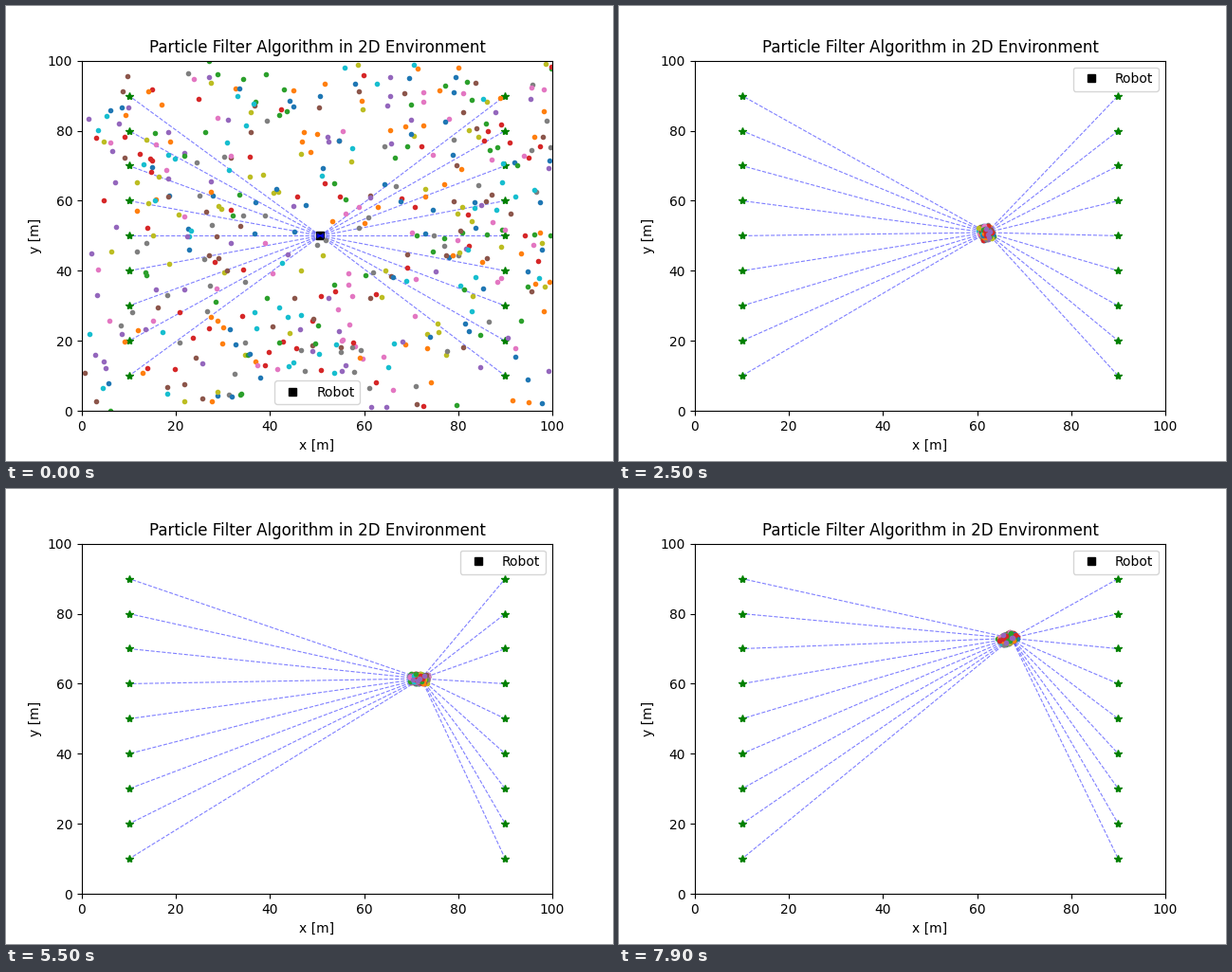
Animation of 640x480 px, one loop 8 s. Source, as a matplotlib script:

```python
import numpy as np
import matplotlib.pyplot as plt
from matplotlib.animation import FuncAnimation

FRAMES = 80
COUNT = 500
GROUP = 4   # particles sharing one line artist
SPAN = 16   # frames between two waypoints

WAYPOINTS = np.array([(50.7, 50), (58.05, 49.8), (65.1, 52.4),
                      (71.3, 57.7), (71.7, 66.6), (67, 73.4)])
TANGENTS = np.gradient(WAYPOINTS, axis=0)
LANDMARKS = [(x, y) for x in (10, 90) for y in range(10, 100, 10)]


def robot_at(i):
    """Robot position on a smooth curve through the waypoints."""
    k, step = divmod(i, SPAN)
    t = step / SPAN
    p0, p1 = WAYPOINTS[k:k + 2]
    m0, m1 = TANGENTS[k:k + 2]
    ease = t * t * (3 - 2 * t)
    return p0 + ease * (p1 - p0) + t * (1 - t) * ((1 - t) * m0 - t * m1)


def particles(i):
    """Uniform before the first resampling, then a cloud across the heading."""
    rng = np.random.default_rng(100 + i)
    if i == 0:
        cloud = rng.uniform(0, 100, (COUNT, 2))
        under_legend = (abs(cloud[:, 0] - 50) < 10) & (cloud[:, 1] < 10)
        cloud[under_legend, 1] += 10
        return cloud
    ahead = robot_at(i) - robot_at(i - 1)
    c, s = ahead / np.hypot(*ahead)
    spread = np.clip(rng.normal(size=(COUNT, 2)), -2.1, 2.1) * (0.62, 0.88)
    lag = (-0.01 * i, 0)
    return robot_at(i) + lag + spread @ np.array([(c, s), (-s, c)])


fig, ax = plt.subplots(figsize=(6.4, 4.8), dpi=100)
ax.set(xlim=(0, 100), ylim=(0, 100), xlabel="x [m]", ylabel="y [m]",
       title="Particle Filter Algorithm in 2D Environment")

robot, = ax.plot([], [], "ks", label="Robot")
beams = []
for x, y in LANDMARKS:
    beams += ax.plot([], [], "b--", lw=0.8, alpha=0.5)
    ax.plot(x, y, "g*")
dots = [ax.plot([], [], ".", color=f"C{n % 10}")[0]
        for n in range(COUNT // GROUP)]
legend = ax.legend(loc="upper right")


def draw(i):
    rx, ry = robot_at(i)
    robot.set_data([rx], [ry])
    for beam, (x, y) in zip(beams, LANDMARKS):
        beam.set_data([rx, x], [ry, y])
    for dot, part in zip(dots, np.split(particles(i), len(dots))):
        dot.set_data(*part.T)
    legend.set_loc("upper right" if i else "lower center")
    return [robot, legend, *beams, *dots]


anim = FuncAnimation(fig, draw, frames=FRAMES, interval=100,
                     repeat=True, repeat_delay=0)
plt.show()
```
